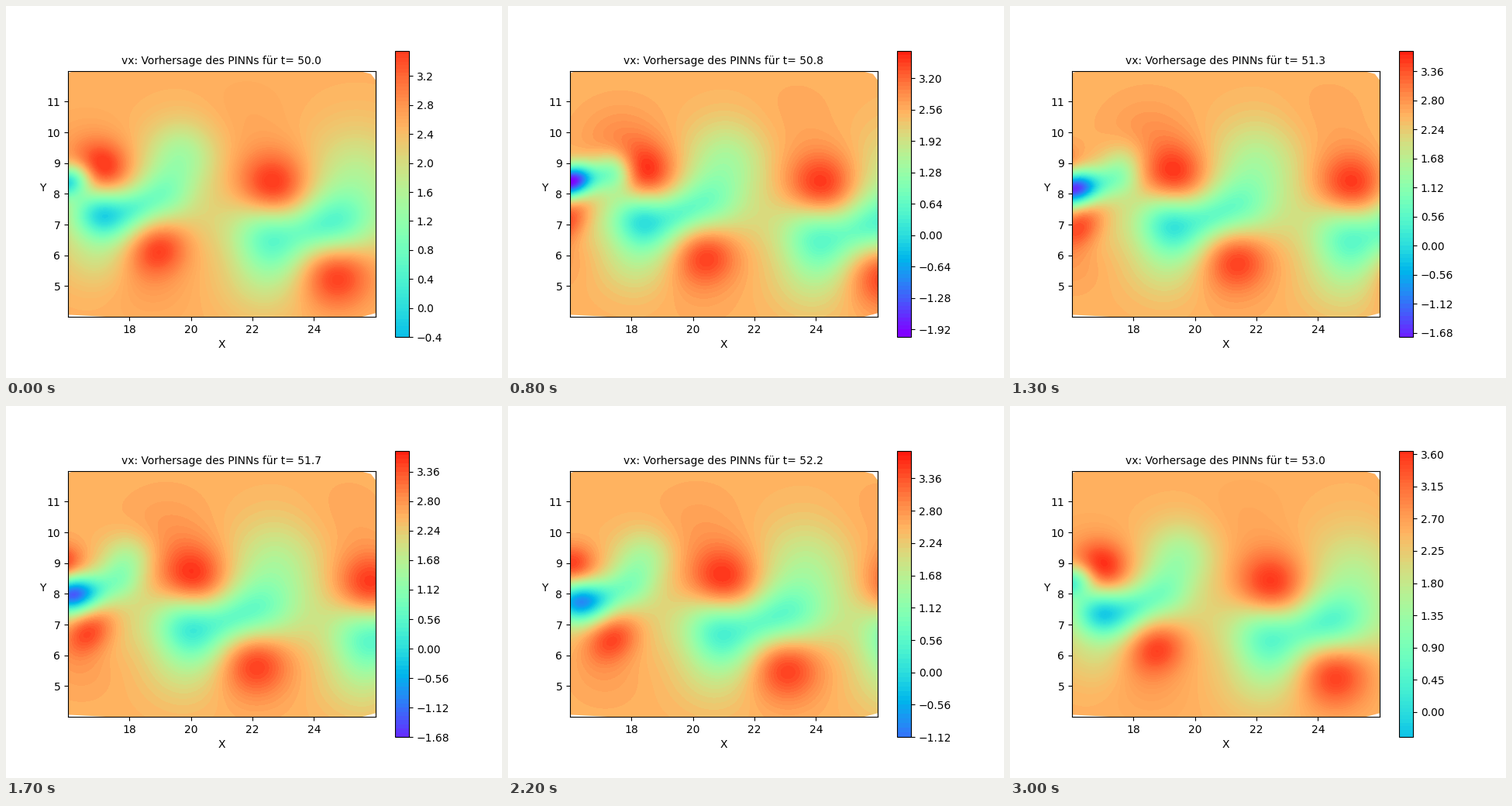
Write a matplotlib script that moves like this. It is 640 px wide and 480 px high and loops after 3100 ms.

```python
import numpy as np
import matplotlib.pyplot as plt
from matplotlib.animation import FuncAnimation

FRAMES = 31
PERIOD = 3.1        # time between two vortices of the same kind
SPEED = 1.87        # drift far downstream
AGES = (0.8, 3.1, 6.2)
X, Y = np.meshgrid(np.linspace(16, 26, 221), np.linspace(4, 12, 177))


class Eddy:
    """Gaussian patch shed once per period: held near x0, then carried off.

    y and value are given at AGES, size and tilt for a young and an old patch.
    """

    def __init__(self, x0, release, y, value, young, old, tilt=(0, 0), born=0, rise=0.8):
        self.x0, self.release, self.y, self.value = x0, release, y, value
        self.size, self.tilt = (young, old), tilt
        self.born, self.rise = born, rise

    def centre(self, age):
        x = self.x0 + SPEED * np.logaddexp(0, 2 * (age - self.release)) / 2
        return x, np.interp(age, AGES, self.y), np.interp(age, AGES, self.value)

    def fade(self, age):
        u = np.clip((age - self.born) / self.rise, 0, 1)
        return u * u * (3 - 2 * u)

    def shape(self, age, x, y):
        cx, cy, _ = self.centre(age)
        old = np.clip((age - 1) / 4, 0, 1)
        sx, sy = (a + (b - a) * old for a, b in zip(*self.size))
        angle = np.radians(self.tilt[0] + (self.tilt[1] - self.tilt[0]) * old)
        c, s = np.cos(angle), np.sin(angle)
        dx, dy = x - cx, y - cy
        u, v = (c * dx + s * dy) / sx, (c * dy - s * dx) / sy
        return np.exp(-(u * u + v * v) / 2)


EDDIES = [
    # fast cores and their shoulders
    Eddy(15.6, 2.42, (9.1, 8.82, 8.15), (3.4, 3.5, 3.45),
         (0.4, 0.33), (0.8, 0.8), born=0.9),
    Eddy(15.6, 1.33, (7.15, 6.22, 5.35), (3.4, 3.48, 3.45),
         (0.62, 0.42), (0.78, 0.75), tilt=(45, 0)),
    Eddy(15.8, 3.0, (9.6, 9.5, 10.4), (2.7, 3.05, 2.6),
         (0.5, 0.45), (1.0, 0.9), born=1.6),
    Eddy(15.5, 1.4, (6.0, 5.0, 4.2), (2.75, 2.8, 2.8),
         (0.7, 0.6), (1.0, 0.8)),
    # slow cores, the neck between them and the lobes behind
    Eddy(16.0, 2.68, (8.4, 7.33, 6.6), (-2.05, -0.15, 0.62),
         (0.5, 0.36), (0.85, 0.75), tilt=(20, -45), born=-0.9, rise=1.7),
    Eddy(17.4, 2.3, (8.7, 7.98, 7.02), (1.05, 0.85, 0.55),
         (0.45, 0.45), (0.82, 0.7), born=0.1),
    Eddy(16.7, 2.4, (8.45, 7.55, 6.8), (-0.15, 0.55, 0.75),
         (0.42, 0.36), (0.6, 0.5), tilt=(25, 15), born=0.3),
    Eddy(15.9, 2.75, (6.4, 6.05, 5.3), (1.5, 1.5, 1.52),
         (0.6, 0.6), (0.95, 0.9), born=2.6),
    Eddy(17.6, 2.05, (9.2, 9.2, 8.5), (1.6, 1.33, 1.5),
         (0.5, 0.42), (1.1, 1.15), born=0.9),
]

# measured extremes of the field, which set the colour bar
KEY_TIMES = (0, 0.4, 0.8, 1.3, 1.7, 2.2, 3)
LOWEST = (-0.38, -1.48, -2.04, -1.72, -1.64, -1.08, -0.33)
HIGHEST = (3.53, 3.66, 3.73, 3.73, 3.73, 3.81, 3.62)

# areas near the corners without data
GAPS = [
    [(25.45, 12), (25.85, 11.9), (26, 11.7), (26, 12)],
    [(25.55, 4), (26, 4.12), (26, 4)],
    [(16, 4.07), (17.3, 4), (16, 4)],
    [(16, 11.92), (16.2, 12), (16, 12)],
]


def background(y):
    return 2.52 - 0.32 * np.exp(-((y - 7.2) / 1.2) ** 2)


def velocity(t):
    """Weight the eddies so that each centre takes its given value."""
    street = [(e, t + k * PERIOD) for k in (-1, 0, 1, 2) for e in EDDIES]
    cx, cy, value = np.array([e.centre(age) for e, age in street]).T
    fade = np.array([e.fade(age) for e, age in street])
    overlap = np.array([e.shape(age, cx, cy) for e, age in street]).T
    eye = np.eye(len(street))
    weights = np.linalg.solve(eye + fade[:, None] * (overlap - eye),
                              fade * (value - background(cy)))
    return background(Y) + sum(w * e.shape(age, X, Y)
                               for w, (e, age) in zip(weights, street) if w)


def contour_levels(low, high):
    step = next(s for s in (0.05, 0.06, 0.08) if s * 81 >= high - low)
    return np.round(np.arange(np.floor(low / step), np.ceil(high / step) + 1) * step, 2)


def draw(i):
    t = i / 10
    low = np.interp(t, KEY_TIMES, LOWEST)
    high = np.interp(t, KEY_TIMES, HIGHEST)
    fig.clf()
    ax = fig.add_subplot()
    field = ax.contourf(X, Y, np.clip(velocity(t), low, high),
                        levels=contour_levels(low, high),
                        cmap="rainbow", vmin=-2, vmax=4)
    for gap in GAPS:
        ax.fill(*zip(*gap), color="white", lw=0)
    fig.colorbar(field, ax=ax)
    ax.set_aspect("equal")
    ax.set_xlim(16.001, 25.999)
    ax.set_ylim(4.001, 11.999)
    ax.set_xlabel("X")
    ax.set_ylabel("Y", rotation=0)
    ax.set_title(f"vx: Vorhersage des PINNs für t= {50 + t:.1f}", fontsize=10)
    return []


fig = plt.figure(figsize=(6.4, 4.8), dpi=100)
anim = FuncAnimation(fig, draw, frames=FRAMES, interval=100, repeat=True, repeat_delay=0)
plt.show()
```
